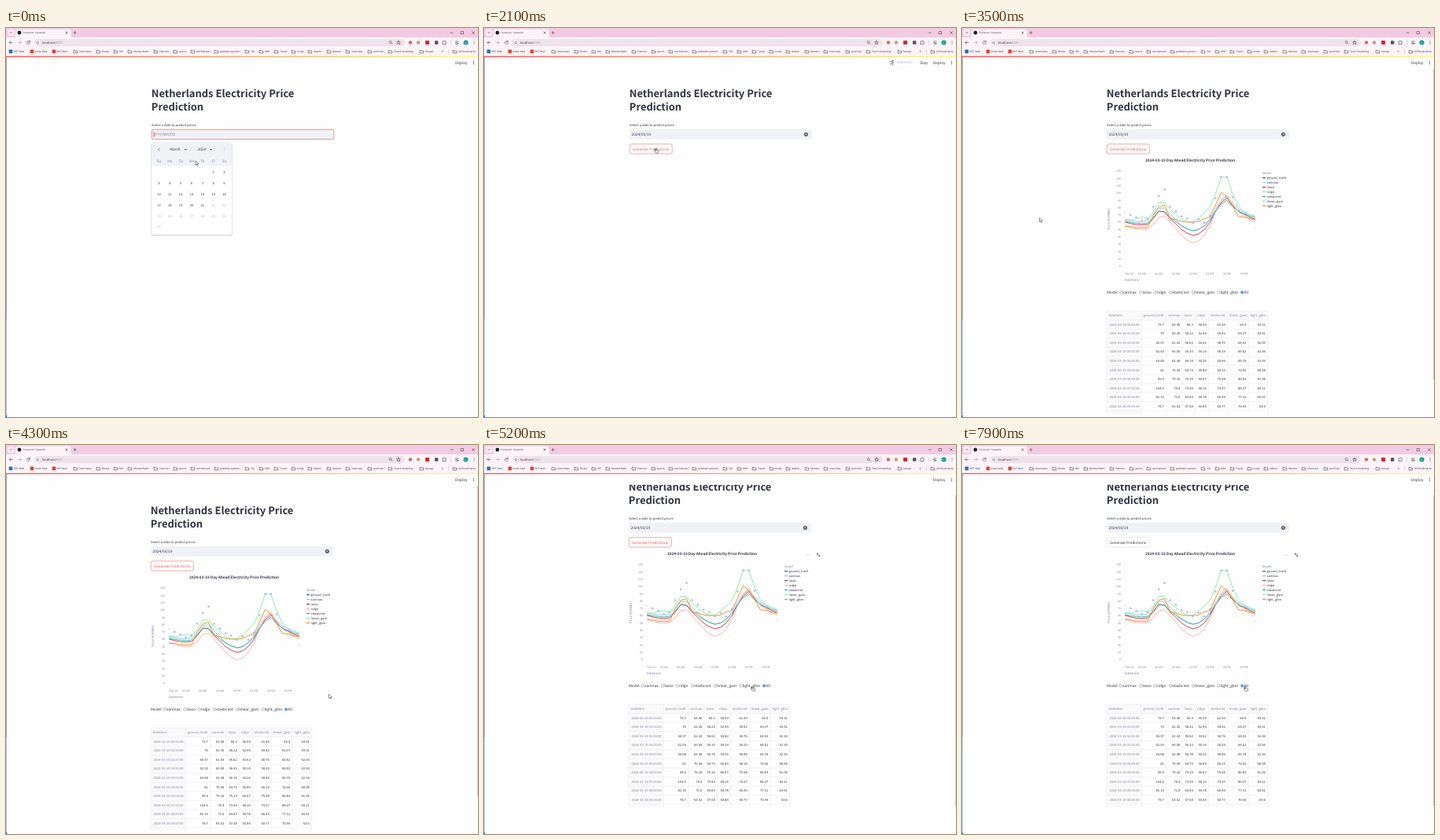
An HTML page for the animation above (8000 ms loop, 600 px wide and 495 px high).

```html
<!DOCTYPE html>
<html lang="en">
<head>
<meta charset="utf-8">
<title>Electricity price prediction</title>
<style>
  html, body { margin: 0; width: 100%; height: 100%; overflow: hidden; background: #fff; }
  svg { display: block; width: 600px; height: 495px; }
  text {
    font-family: "Noto Sans CJK JP", "Noto Sans CJK SC", "Noto Sans CJK", "Open Sans", sans-serif;
    fill: #31333f; text-rendering: geometricPrecision; white-space: pre;
  }
  .ui text { font-family: "Open Sans", "Noto Sans", sans-serif; fill: #333; }
  .ui text.dim { fill: #8d8790; }
  .bold { font-weight: 700; }
  .dim { fill: #808495; }
  .faint { fill: #b4b6bf; }
  .mid { text-anchor: middle; }
  .end { text-anchor: end; }
  .line { fill: none; stroke: #555; stroke-width: .7; stroke-linecap: round; stroke-linejoin: round; }
  .rule { fill: none; stroke: #e6e7eb; stroke-width: .5; }
  .series { fill: none; stroke-width: .9; stroke-linejoin: round; }
</style>
</head>
<body>
<svg viewBox="0 0 600 495" xmlns="http://www.w3.org/2000/svg">
  <defs>
    <linearGradient id="stripe"><stop stop-color="#ff4b4b"/><stop offset="1" stop-color="#fffd80"/></linearGradient>
  </defs>
  <rect width="600" height="495" fill="#fefefe"/>
  <g id="form"></g>
  <g id="results"></g>
  <g id="calendar"></g>
  <rect y="36" width="600" height="14.6" fill="#fefefe"/>
  <g id="header"></g>
  <g id="chrome" class="ui"></g>
  <path id="arrow" d="M0 0V5.2L1.3 4.1L2.2 6L3 5.6L2.2 3.8H3.8Z" fill="#fff" stroke="#222" stroke-width=".5"/>
  <path id="hand" d="M-.6 .5Q0-.4 .6 .5V2.4L2.7 2.9Q3.3 3.2 3.1 4L2.5 6H-.5L-2.2 3.8Q-2-3.1 -.6 3.8Z"
        fill="#fff" stroke="#222" stroke-width=".5" stroke-linejoin="round"/>
</svg>
<script>
const LOOP = 8000, STEP = 100;
const $ = id => document.getElementById(id);
const range = n => [...Array(n).keys()];

// y is the middle of the capitals
const text = (x, y, s, size = 4.74, cls = '', extra = '') =>
  `<text x="${x}" y="${(y + size * .36).toFixed(2)}" font-size="${size}" class="${cls}" ${extra}>${s}</text>`;
const rect = (x, y, w, h, fill, r = 0, extra = '') =>
  `<rect x="${x}" y="${y}" width="${w}" height="${h}" rx="${r}" fill="${fill}" ${extra}/>`;
const dot = (x, y, r, fill, extra = '') => `<circle cx="${x}" cy="${y}" r="${r}" fill="${fill}" ${extra}/>`;
const line = (d, extra = '') => `<path class="line" d="${d}" ${extra}/>`;

/* browser window */
const folder = x => `<path class="line" d="M${x - 2} 28.4h1.5l.6 .7h2.1v2.8h-4.2z" stroke-width=".55"/>`;
const bookmarks = [
  [93, 'Interviews'], [122, 'Books'], [144, 'MV'], [162, 'Mental Math'], [195, 'Halvorn'],
  [220, 'sports'], [242, 'worksheets'], [272, 'pebbled systems'], [311, 'SIG'], [329, 'MW'],
  [348, 'Travel'], [370, 'study'], [391, 'dabrin'], [415, 'Mentor'], [439, 'interview'],
  [467, 'portfolio'], [493, 'Task Scheduling'], [533, 'fastapi'], [575, 'All Bookmarks']
];
const mails = [[6, '#1a73c9', 10, 'RVT Mail'], [33, '#d9483b', 36.5, 'Vosto Mail'], [61, '#d9483b', 64.5, 'RVT Mail']];

$('chrome').innerHTML =
  rect(0, 0, 600, 12, '#f2cbe2') +
  rect(2, 1.5, 8.5, 8.5, '#fbeaf4', 2.5) + line('M5 5.3l1.2 1.2l1.2-1.2') +
  '<path d="M10 12Q12 12 12 9.5V4Q12 1.5 14.5 1.5H80Q82.5 1.5 82.5 4V9.5Q82.5 12 84.5 12Z" fill="#fdf4f9"/>' +
  dot(17, 6, 2.4, '#222') + text(21.5, 6, 'Frontend · Streamlit', 3.1) +
  line('M75.8 4.8l2.4 2.4m0-2.4l-2.4 2.4') + line('M86 6h3.2m-1.6-1.6v3.2') +
  line('M565 6h3.2M578.5 4.5h3v3h-3zM592.6 4.6l2.8 2.8m0-2.8l-2.8 2.8') +
  rect(0, 12, 600, 24, '#fdf4f9') +
  line('M8.2 18.5H4.2m1.8-1.8l-1.8 1.8l1.8 1.8') +
  line('M15.5 18.5h4m-1.8-1.8l1.8 1.8l-1.8 1.8', 'style="stroke:#aaa"') +
  line('M30.1 17.3A2 2 0 1 0 30.5 18.8M30.4 16.2v1.4h-1.4') +
  rect(36, 14, 471, 9.2, '#efe2ea', 4.6) +
  dot(40.3, 18.6, 2.9, '#fff') + line('M38.9 17.7h2.8M38.9 19.5h2.8') +
  text(46, 18.5, 'localhost:<tspan fill="#9a929b">8501</tspan>', 3.9) +
  dot(488.6, 18, 1.5, 'none', 'stroke="#555" stroke-width=".6"') + line('M489.8 19.2l1.3 1.3') +
  line('M499 16.2l.7 1.6l1.7.1l-1.3 1.1l.4 1.7l-1.5-.9l-1.5.9l.4-1.7l-1.3-1.1l1.7-.1z', 'stroke-width=".5"') +
  dot(514, 18.5, 2.2, '#d66a5c') + dot(524, 18.5, 2.2, '#c39a86') +
  rect(533, 16, 5, 5, '#d8262c', 1) + rect(545, 16.3, 4.4, 4.4, '#555', .8) +
  line('M555.5 16.8h1.2q.5-1.3 1 0h1.3v1.3q1.2.5 0 1v1.5h-3.5z') +
  line('M565.5 15.5v6', 'style="stroke:#d9c3d0"') +
  line('M571.5 17h3.6M571.5 18.6h2M571.5 20.2h1.6') + dot(574.4, 19.8, .9, '#444') +
  dot(584.5, 18.5, 3, '#0f9d8f') + '<text x="583.5" y="19.7" font-size="3" style="fill:#fff">R</text>' +
  [16.7, 18.5, 20.3].map(y => dot(595, y, .5, '#444')).join('') +
  mails.map(([ix, c, x, s]) => rect(ix - 2.3, 27.6, 4.6, 4.6, c, .6) + text(x, 30, s, 3.3)).join('') +
  bookmarks.map(([x, s]) => folder(x - 4.5) + text(x, 30, s, 3.3)).join('') +
  text(553.5, 29.6, '»', 4.6) + line('M562.5 27.5v5', 'style="stroke:#d9c3d0"') +
  rect(0, 35.8, 600, 1.3, 'url(#stripe)') +
  rect(0, 37, .7, 334, '#777') + rect(0, 371, .7, 124, '#8fa6c4') + rect(0, 493, 1.2, 2, '#2a5fa8');

$('header').innerHTML =
  text(571, 44, 'Deploy') + [42.2, 44, 45.8].map(y => dot(594.5, y, .55, '#31333f')).join('') +
  '<g id="running">' +
  dot(519.6, 41.4, .8, '#555') +
  line('M516.6 43.2l1.4-.9l1.4.6l-.9 1.9l1.4 1l-.3 1.6M518.5 44.8l-.8 1.2h-1.4M519.3 43l.9 1h1') +
  text(525, 44, 'RUNNING...', 4.14, '', 'style="fill:#a9b9e0"') + text(554, 44, 'Stop') + '</g>';

/* date form */
$('form').innerHTML =
  text(184.8, 83.4, 'Netherlands Electricity Price', 12.94, 'bold') +
  text(184.8, 100.7, 'Prediction', 12.94, 'bold') +
  text(185, 123.6, 'Select a date to predict prices', 4.14) +
  rect(185, 129, 232, 12.8, '#f0f2f6', 2.2) +
  '<g id="empty">' +
  rect(185.2, 129.2, 231.6, 12.4, 'none', 2.2, 'stroke="#ff4b4b" stroke-width=".6"') +
  text(188, 135.4, 'YYYY/MM/DD', 4.74, 'dim') + line('M188 132.5v5.8', 'stroke-width=".5"') + '</g>' +
  '<g id="filled">' + text(187.6, 135.4, '2024/03/19') +
  dot(409.3, 135.3, 2.6, '#5c5e69') +
  '<path d="M408.3 134.3l2 2m0-2l-2 2" stroke="#fff" stroke-width=".6"/>' +
  rect(185.2, 147.7, 54, 12.3, '#fff', 2.4, 'id="frame" stroke-width=".5"') +
  text(189, 153.9, 'Generate Predictions', 4.74, '', 'id="label"') + '</g>';

/* calendar: the month starts on a Friday, days after the 21st are disabled */
const col = i => 194.5 + 13.83 * i;
$('calendar').innerHTML =
  rect(184, 146, 104, 119, 'rgba(40,45,60,.07)', 3) + rect(184.5, 145.5, 103, 118.5, 'rgba(40,45,60,.1)', 3) +
  rect(185, 145, 102, 118, '#fff', 2.5) +
  '<path d="M185 175.5V147.5Q185 145 187.5 145H284.5Q287 145 287 147.5V175.5Z" fill="#f0f2f6"/>' +
  line('M195 152.9l-1.5 1.6l1.5 1.6', 'stroke-width=".8"') +
  line('M277.3 152.9l1.5 1.6l-1.5 1.6', 'style="stroke:#c9cbd2"') +
  text(208.2, 154.4, 'March') + text(243.6, 154.4, '2024') +
  '<path d="M226.8 154h3l-1.5 1.7zM259 154h3l-1.5 1.7z" fill="#31333f"/>' +
  ['Su', 'Mo', 'Tu', 'We', 'Th', 'Fr', 'Sa'].map((s, i) => text(col(i), 169.5, s, 4.5, 'dim mid')).join('') +
  range(31).map(d => {
    const cell = d + 5;
    return text(col(cell % 7), 184 + 13.8 * Math.floor(cell / 7), d + 1, 4.14, d > 20 ? 'mid faint' : 'mid');
  }).join('');

/* model data: ten hours shown in the table, then the rest of the day */
const table = {
  ground_truth: [73.7, 70, 66.57, 62.53, 64.68, 81, 95.9, 104.6, 81.19, 74.7],
  sarimax: [63.46, 62.35, 61.04, 60.58, 62.48, 70.44, 79.16, 79.4, 71.6, 63.52],
  lasso: [60.3, 58.22, 56.62, 56.33, 56.78, 64.75, 75.19, 73.99, 64.83, 57.58],
  ridge: [56.59, 52.44, 50.62, 50.14, 50.26, 56.89, 66.67, 68.15, 59.78, 50.84],
  elasticnet: [61.44, 59.92, 58.76, 58.29, 58.96, 66.14, 75.38, 74.37, 66.49, 60.77],
  linear_gam: [64.4, 63.07, 64.82, 66.82, 65.78, 72.65, 86.83, 86.07, 77.31, 70.94],
  light_gbm: [54.31, 54.31, 52.34, 52.34, 52.34, 68.98, 81.06, 83.21, 64.91, 63.6]
};
const lasso = [50, 45, 42, 44, 50, 60, 75, 87, 93, 83, 75, 71, 67, 64];
const like = (k, b) => lasso.map(v => v * k + b);
const later = {
  ground_truth: [68, 65, 59, 64, 59, 69, 93, 122, 122, 94, 76, 72, 65, 52.5],
  sarimax: like(.92, 9.4),
  lasso,
  ridge: like(1.29, -22.5),
  elasticnet: like(.81, 14.4),
  linear_gam: [64, 61, 61, 66, 73, 81, 99, 122, 121, 99, 82, 74, 69, 67],
  light_gbm: [61, 60, 60, 61, 65, 67, 84, 101, 94, 82, 68, 67, 65, 63]
};
const colors = {
  ground_truth: '#0068c9', sarimax: '#83c9ff', lasso: '#dc2433', ridge: '#ffabab',
  elasticnet: '#29b09d', linear_gam: '#7defa1', light_gbm: '#f58a14'
};
const names = Object.keys(table), models = names.slice(1);
const day = name => [...table[name], ...later[name]];
const px = h => +(207 + 7.21 * h).toFixed(2), py = v => +(303 - .931 * v).toFixed(2);

const chart =
  text(290, 168, '2024-03-19 Day Ahead Electricity Price Prediction', 4.74, 'bold mid') +
  range(14).map(i => text(202, py(i * 10), i * 10, 3.58, 'dim end')).join('') +
  text(0, 0, 'Price (€/MWH)', 4.2, 'dim mid', 'transform="translate(186.8 243) rotate(-90)"') +
  ['Tue 19', '03 AM', '06 AM', '09 AM', '12 PM', '03 PM', '06 PM', '09 PM'].map((s, i) =>
    text(i ? px(i * 3) : 207, 312.5, s, 3.58, i ? 'dim mid' : 'dim')).join('') +
  text(207, 320.7, 'Datetime', 4.2, 'dim') +
  models.map(n => `<polyline id="line-${n}" class="series" stroke="${colors[n]}" points="${
    day(n).map((v, h) => px(h) + ',' + py(v)).join(' ')}"/>`).join('') +
  day('ground_truth').map((v, h) => dot(px(h), py(v), h % 23 ? 1.25 : .7, '#b5adf3')).join('') +
  text(382, 184.4, 'Model', 3.9, 'dim') +
  names.map((n, i) => {
    const y = 190.6 + 5.95 * i;
    return rect(382, y - .6, 4, 1.2, colors[n]) + text(387.6, y, n, 3.9);
  }).join('') +
  '<g id="tools">' + [410.6, 412, 413.4].map(x => dot(x, 170, .4, '#888')).join('') +
  line('M423.6 168.3l3 3M423.4 169.6v-1.5h1.5M426.8 170v1.5h-1.5') + '</g>';

const choices = [...models, 'All'];
const radioX = [202, 227.3, 245.5, 265, 294, 326.4, 356];
const radios = text(184, 336.6, 'Model:') + choices.map((n, i) =>
  dot(radioX[i], 336.4, 1.75, '#fff', `id="ring-${n}" stroke-width=".5"`) +
  dot(radioX[i], 336.4, 1.1, '#0b6fd8', `id="pip-${n}"`) +
  text(radioX[i] + 2.3, 336.6, n)).join('');

const edges = [184, 228, 259.5, 280, 296.3, 313.3, 337.3, 363.8, 388.5], rowH = 11.55;
const grid =
  rect(184, 360, 204.5, rowH, '#fafafb') + rect(184, 360, 44, 131, '#fafafb') +
  `<path class="rule" d="${edges.map(x => `M${x} 360V491`).join('')}${
    range(12).map(i => `M184 ${360 + rowH * i}H388.5`).join('')}"/>` +
  ['datetime', ...names].map((s, i) => text(edges[i] + 2.6, 366, s, 4.14, 'dim')).join('') +
  range(10).map(r => {
    const y = 377.3 + rowH * r;
    return text(225.6, y, `2024-03-19 0${r}:00:00`, 4.14, 'dim end') +
      names.map((n, i) => text(edges[i + 2] - 2.6, y, table[n][r], 4.14, 'end')).join('');
  }).join('');

$('results').innerHTML = chart + radios + grid;
$('header').innerHTML += rect(598.8, 52, 1.2, 395, '#c9cbd2', .6, 'id="bar"');

/* timeline, in ms */
const path = [
  [0, 241, 169], [900, 221, 222], [1000, 223.5, 223.5], [1200, 223.5, 223.5], [1700, 219, 153],
  [2500, 219, 153], [3000, 165, 195], [3500, 98.5, 241.5], [3700, 98.5, 241.5], [4200, 405, 316],
  [4500, 421.5, 319.5], [4700, 415, 312], [5300, 327, 306], [5800, 327, 306], [6200, 296, 305],
  [6400, 294.5, 305], [6600, 294, 305], [6900, 265, 305], [7200, 246, 305], [7300, 246, 305],
  [7700, 358, 306.5], [7900, 360.5, 307]
];
const scrolls = [[0, 0], [4300, 0], [4400, 13], [4500, 23.4], [4600, 28.6], [4700, 30]];
const picks = [
  [0, 'All'], [5500, 'light_gbm'], [6400, 'linear_gam'], [6900, 'elasticnet'], [7200, 'ridge'], [7700, 'All']
];

const held = (keys, t) => keys.filter(k => k[0] <= t).pop()[1];
const tween = (keys, t, i = 1) => {
  const n = keys.findIndex(k => k[0] > t);
  if (n < 0) return keys[keys.length - 1][i];
  const a = keys[n - 1], b = keys[n];
  return a[i] + (b[i] - a[i]) * (t - a[0]) / (b[0] - a[0]);
};
const show = (id, on) => $(id).setAttribute('visibility', on ? 'visible' : 'hidden');
const move = (id, x, y) => $(id).setAttribute('transform', `translate(${x} ${y})`);

function draw(now) {
  const t = Math.floor(now % LOOP / STEP) * STEP;
  const chosen = t >= 1000, ready = t >= 2600, scroll = tween(scrolls, t);

  $('calendar').style.display = chosen ? 'none' : '';
  $('empty').style.display = chosen ? 'none' : '';
  $('filled').style.display = chosen ? '' : 'none';
  $('results').style.display = ready ? '' : 'none';
  $('tools').style.display = t >= 4800 ? '' : 'none';
  show('running', t >= 1900 && t < 2600);
  show('bar', ready);

  move('form', ready ? -1 : 0, -scroll);
  move('results', 0, -scroll);
  move('bar', 0, scroll * .4);

  const active = t >= 1600 && t < 5500;
  $('frame').setAttribute('stroke', active ? '#ff4b4b' : '#d6d6d9');
  $('label').style.fill = active ? '#ff4b4b' : '#31333f';

  const pick = held(picks, t);
  models.forEach(n => { $('line-' + n).style.display = pick === 'All' || pick === n ? '' : 'none'; });
  choices.forEach(n => {
    $('ring-' + n).setAttribute('stroke', pick === n ? '#0b6fd8' : '#767676');
    $('pip-' + n).style.display = pick === n ? '' : 'none';
  });

  const x = tween(path, t), y = tween(path, t, 2);
  const hand = (t < 1000 && y > 178) || (t >= 1600 && t < 2600) || t >= 5200;
  show('hand', hand);
  show('arrow', !hand);
  move('hand', x, y);
  move('arrow', x, y);
}

function loop() {
  draw(performance.now());
  requestAnimationFrame(loop);
}
loop();
</script>
</body>
</html>
```
